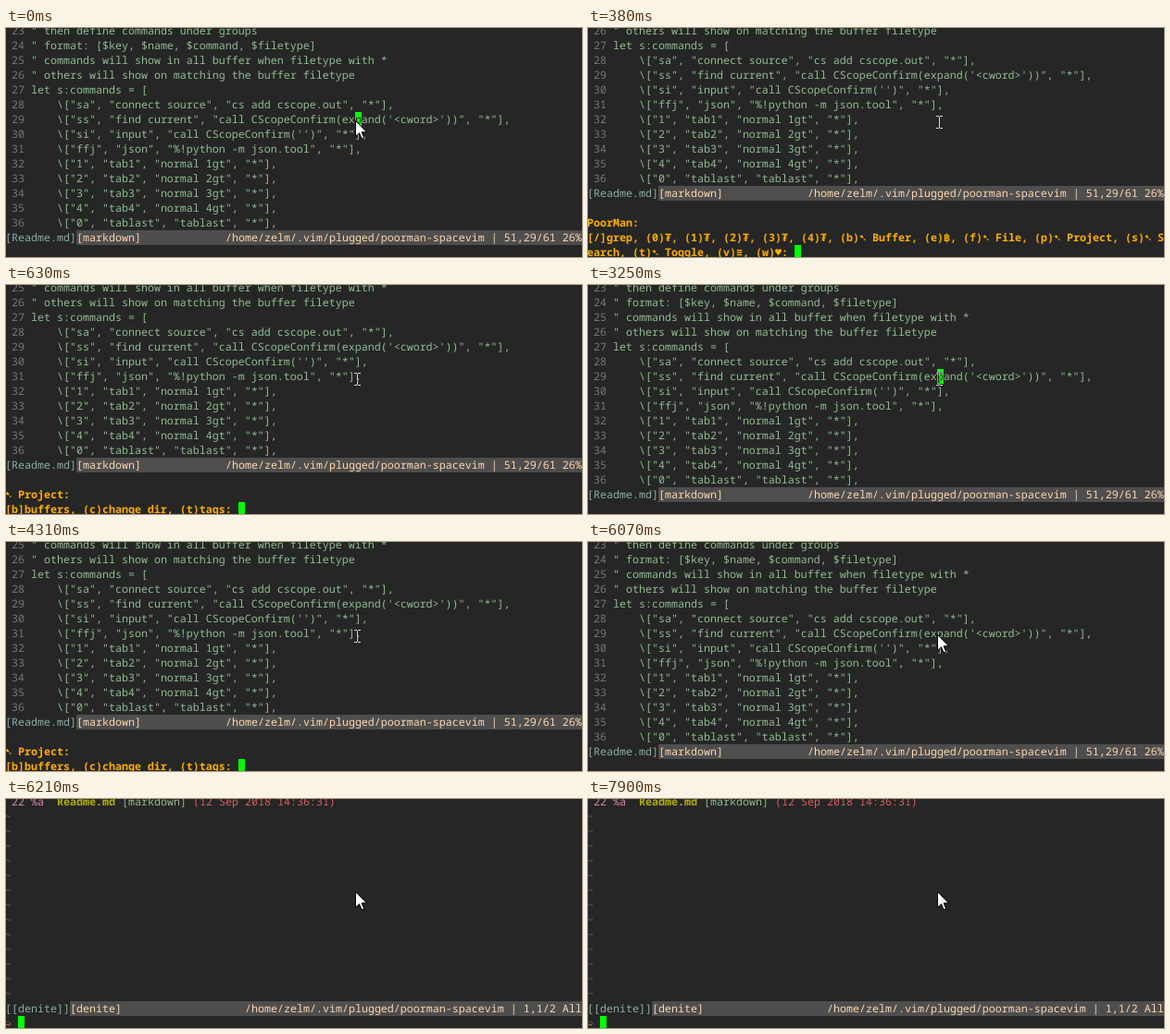
Animation of 622x248 px, one loop 8 s. Source, as an HTML page:

```html
<!DOCTYPE html>
<html lang="en">
<head>
<meta charset="utf-8">
<title>Vim command menu</title>
<style>
html, body { margin: 0; width: 100%; height: 100%; overflow: hidden; background: #262626; }
#stage { position: relative; width: 622px; height: 248px; overflow: hidden; background: #262626;
  font: 11.667px/18px "Noto Sans Mono", "DejaVu Sans Mono", monospace; text-rendering: geometricPrecision; }
.screen { position: absolute; inset: 0; }
.screen span { position: absolute; height: 16px; white-space: pre; }
svg { position: absolute; left: 0; top: 0; }
#beam { mix-blend-mode: difference; }
</style>
</head>
<body>
<div id="stage"></div>
<script>
const CELL = 7, LINE = 16, COLS = 89, LOOP = 8000;
const GREEN = '#8fbc8f', TEAL = '#87afa5', CREAM = '#ffd7af', AMBER = '#ffaf00', GRAY = '#767676', BAR = '#4e4e4e';
const PATH = '/home/zelm/.vim/plugged/poorman-spacevim';
const code = String.raw`" then define commands under groups
" format: [$key, $name, $command, $filetype]
" commands will show in all buffer when filetype with *
" others will show on matching the buffer filetype
let s:commands = [
    \["sa", "connect source", "cs add cscope.out", "*"],
    \["ss", "find current", "call CScopeConfirm(expand('<cword>'))", "*"],
    \["si", "input", "call CScopeConfirm('')", "*"],
    \["ffj", "json", "%!python -m json.tool", "*"],
    \["1", "tab1", "normal 1gt", "*"],
    \["2", "tab2", "normal 2gt", "*"],
    \["3", "tab3", "normal 3gt", "*"],
    \["4", "tab4", "normal 4gt", "*"],
    \["0", "tablast", "tablast", "*"],`.split('\n');

const stage = document.getElementById('stage');

function screen() {
  const el = document.createElement('div');
  el.className = 'screen';
  stage.append(el);
  return el;
}

// Writes text on the terminal grid; symbols get a cell of their own.
function put(el, row, col, text, color, bold) {
  for (const part of text.match(/[ -~]+|[^ -~]/g)) {
    const s = document.createElement('span');
    s.textContent = part;
    s.style.cssText = `left:${col * CELL - 1}px;top:${row * LINE - 5}px;color:${color};font-weight:${bold ? 700 : 400}`;
    el.append(s);
    col += part.length;
  }
}

function block(el, row, col, cols, color) {
  const s = document.createElement('span');
  s.style.cssText = `left:${col * CELL - 1}px;top:${row * LINE - 5}px;width:${cols * CELL}px;background:${color}`;
  el.append(s);
}

function status(el, row, name, type, position) {
  put(el, row, 0, name, TEAL);
  block(el, row, name.length, COLS - name.length, BAR);
  put(el, row, name.length, type, CREAM);
  const right = PATH + ' | ' + position;
  put(el, row, COLS - right.length, right, CREAM);
}

function editor(first, prompt = []) {
  const el = screen();
  code.slice(first - 23).forEach((line, i) => {
    put(el, i, 1, String(first + i), GRAY);
    put(el, i, 4, line, GREEN);
  });
  status(el, 37 - first, '[Readme.md]', '[markdown]', '51,29/61 26%');
  const top = 16 - prompt.length;
  prompt.forEach((line, i) => put(el, top + i, 0, line, AMBER, true));
  if (prompt.length) block(el, 15, prompt.at(-1).length, 1, '#00ff00');
  return el;
}

function bufferList() {
  const el = screen();
  put(el, 0, 1, '22 %a', '#d787af');
  put(el, 0, 8, 'Readme.md', '#afaf00', true);
  put(el, 0, 18, '[markdown]', GREEN);
  put(el, 0, 29, '(12 Sep 2018 14:36:31)', '#d75f5f');
  for (let row = 1; row < 14; row++) put(el, row, 0, '~', '#626262');
  status(el, 14, '[[denite]]', '[denite]', '1,1/2 All');
  return el;
}

const screens = {
  edit: editor(23),
  menu: editor(26, ['PoorMan:',
    '[/]grep, (0)₮, (1)₮, (2)₮, (3)₮, (4)₮, (b)➷ Buffer, (e)฿, (f)➷ File, (p)➷ Project, (s)➷ S',
    'earch, (t)➷ Toggle, (v)≡, (w)♥: ']),
  project: editor(25, ['➷ Project:', '[b]buffers, (c)change dir, (t)tags: ']),
  list: bufferList()
};

const caret = screen();
block(caret, 6, 54, 1, '#00ff00');
put(caret, 6, 54, 'p', '#262626');

const input = screen();
put(input, 15, 0, '➭', '#af5f5f');
block(input, 15, 2, 1, '#00ff00');

stage.insertAdjacentHTML('beforeend', `
<svg id="arrow" width="622" height="248"><path d="M377.5 100.5v17l4-3.7 2.6 6 2.6-1.1-2.6-5.9h5.4z" fill="#fff" stroke="#000"/></svg>
<svg id="beam" width="622" height="248"><path d="M376 95.5h3m1 0h3M379.5 96v12M376 108.5h3m1 0h3" fill="none" stroke="#fff"/></svg>`);
const arrow = document.getElementById('arrow'), beam = document.getElementById('beam');

// start time, screen, pointer, whether the text cursor shows
const steps = [
  [0, 'edit', arrow, true],
  [380, 'menu', beam, true],
  [630, 'project', beam, true],
  [3250, 'edit', beam, true],
  [4170, 'menu', beam, true],
  [4310, 'project', beam, true],
  [6070, 'edit', arrow, false],
  [6210, 'list', arrow, true],
  [7760, 'list', arrow, false],
  [7900, 'list', arrow, true]
];

const show = (el, on) => { el.style.display = on ? 'block' : 'none'; };

function draw() {
  const t = performance.now() % LOOP;
  const [, name, pointer, cursor] = steps.findLast(step => step[0] <= t);
  for (const key in screens) show(screens[key], key === name);
  show(caret, name === 'edit' && cursor);
  show(input, name === 'list' && cursor);
  show(arrow, pointer === arrow);
  show(beam, pointer === beam);
  requestAnimationFrame(draw);
}
draw();
</script>
</body>
</html>
```
